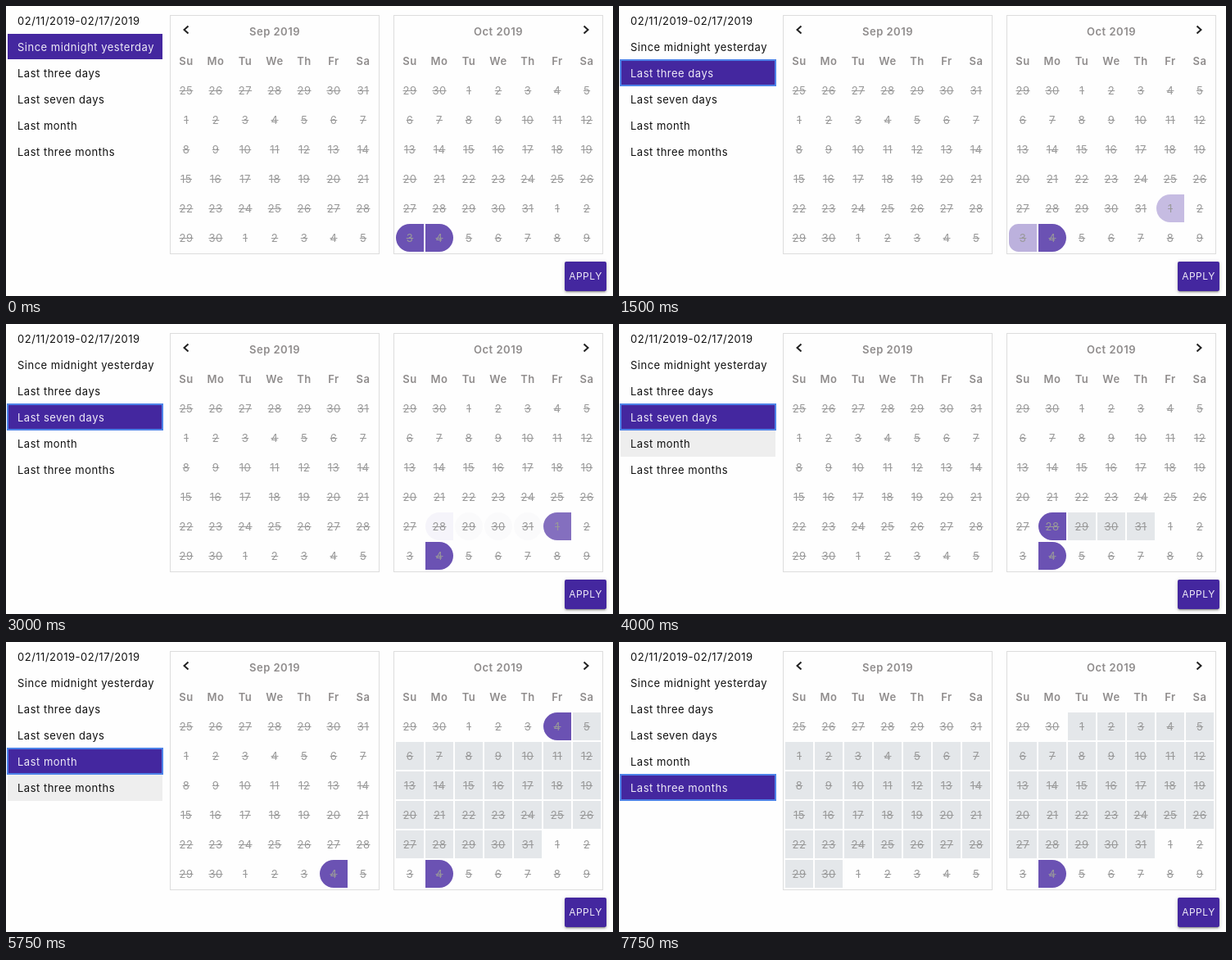
Write an HTML page that moves like this. It is 741x354 px and loops after 9.5 s.

```html
<!DOCTYPE html>
<html lang="en">
<head>
<meta charset="utf-8">
<title>Date range picker</title>
<style>
html, body { margin: 0; width: 100%; height: 100%; overflow: hidden; background: #fefefe; }
body { position: relative; font: 13px/34px Inter, sans-serif; letter-spacing: .5px; }
div { position: absolute; box-sizing: border-box; white-space: nowrap; }
.item { left: 2px; width: 189px; height: 32px; padding-left: 12px; line-height: 32px; color: #111; }
.hover { background: #eee; }
.selected { height: 31px; background: #44279f; color: #eeeaf7; }
.ring { box-shadow: 0 0 0 1px #4d82e8, inset 0 0 0 1px #4d82e8; }
.panel { top: 11px; width: 256px; height: 292px; border: 1px solid #ddd; }
.title, .week { color: #8f8c8c; font-weight: 600; text-align: center; }
.title { top: 2px; left: 0; width: 254px; }
.week, .day { width: 34px; height: 34px; text-align: center; }
.day { color: #999; text-decoration: line-through; }
.apply { left: 682px; top: 312px; width: 51px; height: 36px; border-radius: 2px; background: #44279f;
  color: #eeeaf7; font-size: 12px; line-height: 36px; text-align: center;
  box-shadow: 0 3px 1px -2px #0003, 0 2px 2px #0002, 0 1px 5px #0003; }
svg { position: absolute; left: 0; top: 0; fill: none; stroke: #222; stroke-width: 2; }
</style>
</head>
<body>
<svg width="741" height="354"><path d="M222.5 24.5L217.5 29L222.5 33.5M705.5 24.5L710.5 29L705.5 33.5"/></svg>
<script>
const LOOP = 9500, ROUND = 26;
const NONE = 0, RANGE = 1, START = 2, END = 3;
const GREY = [228, 231, 234], PURPLE = [107, 82, 179];
const COLORS = [null, GREY, PURPLE, PURPLE];

const LABELS = ['02/11/2019-02/17/2019', 'Since midnight yesterday', 'Last three days',
  'Last seven days', 'Last month', 'Last three months'];
const day = (month, date) => Date.UTC(2019, month - 1, date);
const STARTS = [0, day(11, 3), day(11, 1), day(10, 28), day(10, 4), day(8, 4)];
const LAST = day(11, 4);

// time, selected item, previous item, transition progress, focused item, hovered item
const SCENES = [
  [0, 1, 1, 1, -1, -1],
  [500, 1, 1, 1, -1, 2],
  [1500, 2, 1, .55, 2, -1],
  [1750, 2, 2, 1, 2, -1],
  [2000, 2, 2, 1, 2, 3],
  [3000, 3, 2, .17, 3, -1],
  [3250, 3, 3, 1, 3, -1],
  [4000, 3, 3, 1, 3, 4],
  [4500, 3, 3, 1, 4, 4],
  [4750, 4, 3, .53, 4, -1],
  [5000, 4, 4, 1, 4, -1],
  [5250, 4, 4, 1, 4, 5],
  [6250, 5, 4, .53, 5, -1],
  [6500, 5, 5, 1, 5, -1]
];

function add(parent, className, text, left, top) {
  const el = parent.appendChild(document.createElement('div'));
  el.className = className;
  el.textContent = text;
  if (left !== undefined) el.style.left = left + 'px';
  if (top !== undefined) el.style.top = top + 'px';
  return el;
}

const items = LABELS.map((label, i) => add(document.body, 'item', label, 2, 2 + 32 * i));
const cells = [];

function addMonth(title, left, month, firstDay) {
  const panel = add(document.body, 'panel', '', left);
  add(panel, 'title', title);
  ['Su', 'Mo', 'Tu', 'We', 'Th', 'Fr', 'Sa'].forEach((name, i) =>
    add(panel, 'week', name, 2 + 36 * i, 38));
  for (let i = 0; i < 42; i++) {
    const time = firstDay + i * 864e5, date = new Date(time);
    const el = add(panel, 'day', date.getUTCDate(), 2 + 36 * (i % 7), 74 + 36 * Math.floor(i / 7));
    cells.push({ el, time, off: date.getUTCMonth() + 1 !== month });
  }
}
addMonth('Sep 2019', 200, 9, day(8, 25));
addMonth('Oct 2019', 473, 10, day(9, 29));
add(document.body, 'apply', 'APPLY');

function kindOf({ time, off }, selected) {
  if (time === LAST) return END;
  if (time === STARTS[selected]) return START;
  return !off && time > STARTS[selected] && time < LAST ? RANGE : NONE;
}

// Radii may exceed half a cell; the browser clamps them to a half circle.
function paintCell(cell, from, to, p) {
  const style = cell.el.style;
  if (!from && !to) {
    style.background = 'none';
    return;
  }
  const a = COLORS[from] || COLORS[to], b = COLORS[to] || a;
  const rgb = a.map((v, i) => Math.round(v + (b[i] - v) * p));
  const alpha = from && to ? 1 : from ? 1 - p : to === START ? p ** 1.6 : p;
  const shrinking = ROUND * (1 - p);
  const left = to === START ? ROUND : to === END || from === RANGE ? 0 : shrinking;
  const right = to === END ? ROUND : from === NONE && to === RANGE ? shrinking : 0;
  style.background = `rgba(${rgb},${alpha})`;
  style.borderRadius = `${left}px ${right}px ${right}px ${left}px`;
}

let shown;
function draw() {
  const now = performance.now() % LOOP;
  const scene = SCENES.findLast(s => s[0] <= now);
  if (scene !== shown) {
    shown = scene;
    const [, selected, previous, progress, focused, hovered] = scene;
    items.forEach((el, i) => {
      el.classList.toggle('selected', i === selected);
      el.classList.toggle('ring', i === focused);
      el.classList.toggle('hover', i === hovered);
    });
    cells.forEach(c => paintCell(c, kindOf(c, previous), kindOf(c, selected), progress));
  }
  requestAnimationFrame(draw);
}
draw();
</script>
</body>
</html>
```
